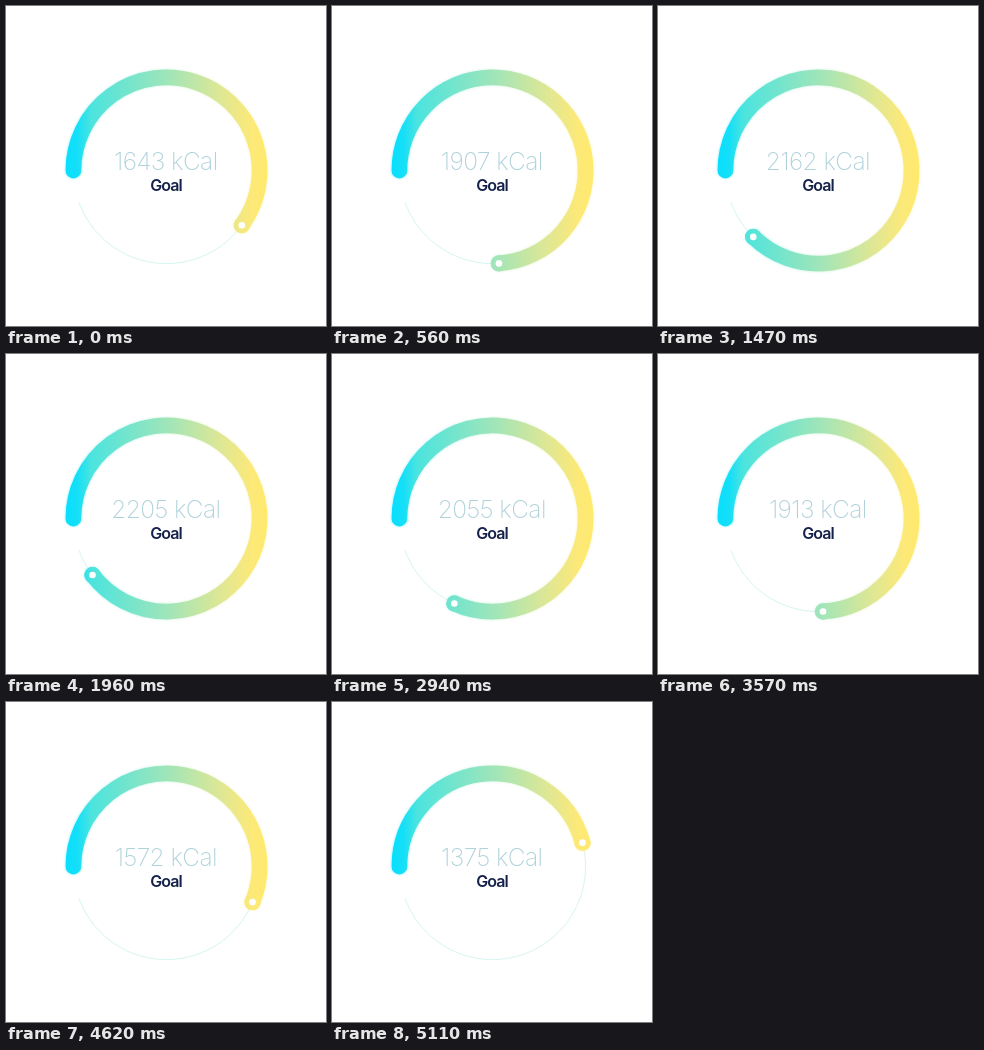
Recreate the animation shown at these times as an HTML page. Size 320x320 px, loop 5180 ms.

```html
<!DOCTYPE html>
<html lang="en">
<head>
<meta charset="utf-8">
<title>Calorie goal</title>
<style>
  html, body { margin: 0; width: 100%; height: 100%; overflow: hidden; background: #fff; }
  svg { display: block; width: 100%; height: 100%; }
  text { font-family: Inter, Roboto, sans-serif; text-anchor: middle; }
  .value { font-size: 24.5px; font-weight: 200; letter-spacing: -0.6px; fill: #b0d2da; }
  .label { font-size: 16px; font-weight: 600; letter-spacing: -1px; fill: #14214a; }
</style>
</head>
<body>
<svg viewBox="0 0 320 320">
  <defs>
    <linearGradient id="hue" gradientUnits="userSpaceOnUse" x1="59" y1="0" x2="262" y2="0">
      <stop offset="0" stop-color="#08dffd"/>
      <stop offset=".06" stop-color="#14dff8"/>
      <stop offset=".13" stop-color="#4ce4de"/>
      <stop offset=".5" stop-color="#9ee5ba"/>
      <stop offset=".77" stop-color="#dfe794"/>
      <stop offset=".92" stop-color="#fce978"/>
      <stop offset="1" stop-color="#ffea6c"/>
    </linearGradient>
    <filter id="soft" filterUnits="userSpaceOnUse" x="0" y="0" width="320" height="320">
      <feGaussianBlur stdDeviation="1.2"/>
    </filter>
  </defs>
  <path id="track" fill="none" stroke="#d6f5f1"/>
  <g fill="none" stroke="url(#hue)" stroke-linecap="round">
    <path id="glow" stroke-width="17" opacity=".3" filter="url(#soft)"/>
    <path id="arc" stroke-width="15.8"/>
  </g>
  <g id="knob">
    <circle id="cap" r="8.2" fill="url(#hue)"/>
    <circle id="dot" r="3.3" fill="#fff"/>
  </g>
  <text id="value" class="value" x="159.8" y="164"></text>
  <text class="label" x="160" y="184.5">Goal</text>
</svg>
<script>
  const LOOP = 5180, STEP = 70;
  const CX = 160.5, CY = 164.5, R = 93.1;
  const START = -180, TRACK_END = 160;

  // time (s), kCal, rate (kCal/s)
  const keys = [
    [0, 1643, 540],
    [1.05, 2071, 270],
    [1.96, 2205, 10],
    [2.94, 2055, -195],
    [3.57, 1913, -275],
    [4.62, 1572, -370],
    [5.11, 1375, -430]
  ];

  const $ = id => document.getElementById(id);

  function set(id, attrs) {
    for (const name in attrs) $(id).setAttribute(name, attrs[name]);
  }

  function point(deg) {
    const a = deg * Math.PI / 180;
    return [CX + R * Math.cos(a), CY + R * Math.sin(a)];
  }

  function arcPath(from, to) {
    const large = to - from > 180 ? 1 : 0;
    return `M${point(from)}A${R} ${R} 0 ${large} 1 ${point(to)}`;
  }

  // cubic Hermite between neighbouring keys
  function kcalAt(t) {
    let i = 0;
    while (i < keys.length - 2 && t >= keys[i + 1][0]) i++;
    const [t0, a, va] = keys[i], [t1, b, vb] = keys[i + 1];
    const h = t1 - t0, u = (t - t0) / h, w = 1 - u;
    return w * w * ((1 + 2 * u) * a + u * h * va)
         + u * u * ((1 + 2 * w) * b - w * h * vb);
  }

  function render(ms) {
    const kcal = kcalAt(Math.floor(ms % LOOP / STEP) * STEP / 1000);
    const deg = 36 + (kcal - 1643) / 5.27;
    const [cx, cy] = point(deg);
    const d = arcPath(START, deg);
    set('arc', { d });
    set('glow', { d });
    set('cap', { cx, cy });
    set('dot', { cx, cy });
    $('value').textContent = Math.round(kcal) + ' kCal';
  }

  set('track', { d: arcPath(START, TRACK_END) });

  let begin;
  function tick(now) {
    begin ??= now;
    render(now - begin);
    requestAnimationFrame(tick);
  }
  render(0);
  requestAnimationFrame(tick);
</script>
</body>
</html>
```
